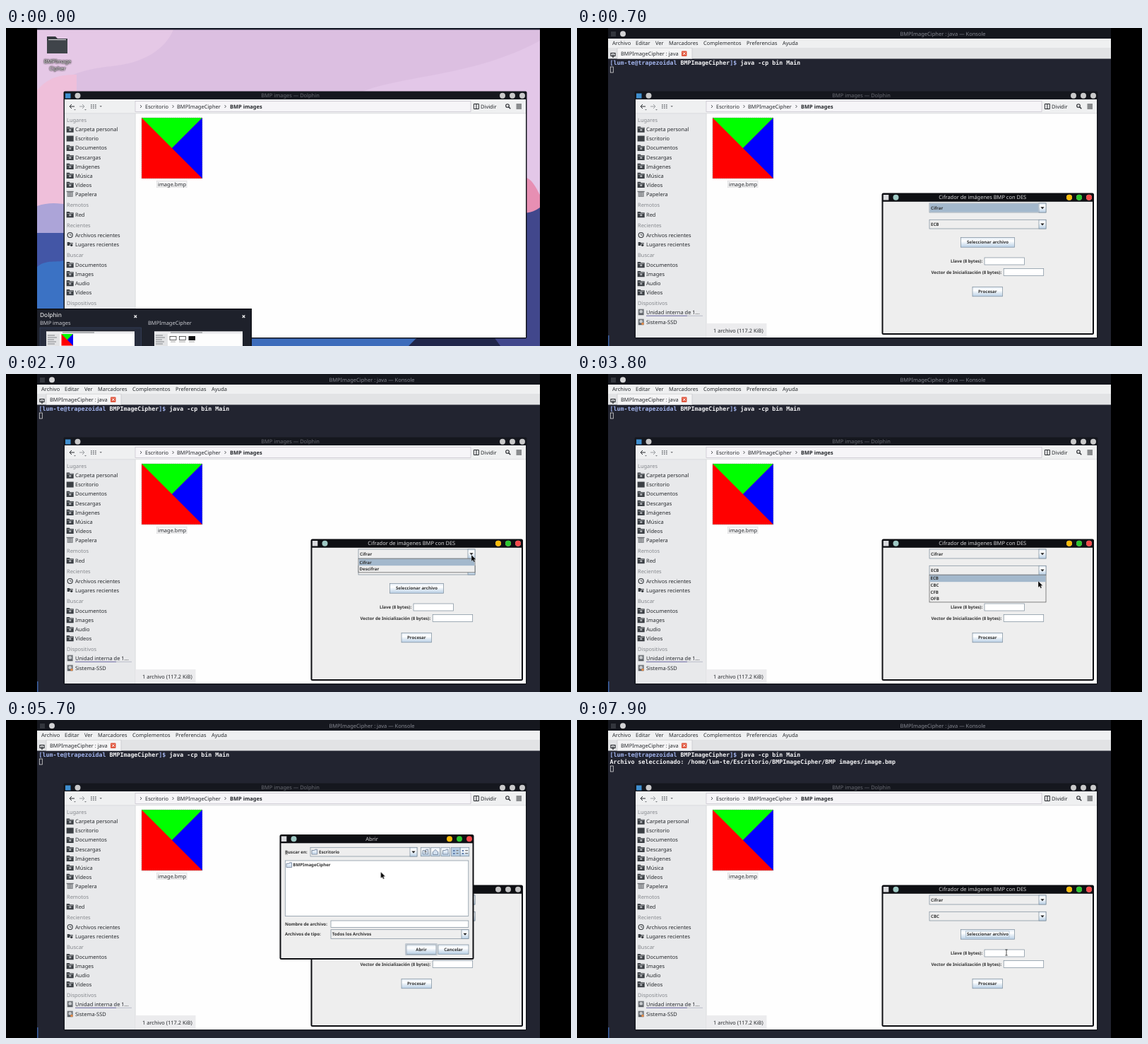
Recreate the animation shown at these times as an HTML page. Size 800 px wide and 450 px high, loop 8000 ms.

```html
<!DOCTYPE html>
<html lang="es">
<head>
<meta charset="utf-8">
<title>Cifrador de imágenes BMP</title>
<style>
html, body { margin: 0; width: 100%; height: 100%; overflow: hidden; background: #000; }
svg { display: block; width: 800px; height: 450px; }
text { font: 7.47px "Noto Sans", "Open Sans", sans-serif; fill: #26292d; white-space: pre; text-rendering: geometricPrecision; }
.b { font-weight: 700; }
.j { font-size: 6.12px; font-weight: 700; fill: #333; }
.m { font: bold 8.3px "DejaVu Sans Mono", "Noto Sans Mono", monospace; fill: #f4f4f6; }
.c { text-anchor: middle; }
.head { fill: #86898e; }
.a { animation: 8s step-end infinite; }
#konsole { animation-name: konsole; }
#tip { animation-name: tip; }
#java { animation-name: java; }
#lit { animation-name: lit; }
#focus1 { animation-name: focus1; }
#pop1 { animation-name: pop1; }
#focus2 { animation-name: focus2; }
#ecb, #wait { animation-name: before; }
#ecb { animation-name: ecb; }
#cbc { animation-name: cbc; }
#pop2 { animation-name: pop2; }
#hover1 { animation-name: hover1; }
#hover2 { animation-name: hover2; }
#ring { animation-name: ring; }
#dialog { animation-name: dialog; }
#home { animation-name: home; }
#desk { animation-name: desk; }
#proj { animation-name: proj; }
#imgs { animation-name: imgs; }
#pick { animation-name: pick; }
#done { animation-name: after; }
#arrow { animation-name: arrow; }
#beam { animation-name: beam; }
#pointer { animation: move 8s linear infinite; }
@keyframes konsole { 0% { opacity: 0 } 1.25% { opacity: .25 } 2.5% { opacity: .5 } 3.75% { opacity: .75 } 5%, to { opacity: 1 } }
@keyframes tip { 0% { opacity: 1 } 1.25% { opacity: .75 } 2.5% { opacity: .5 } 3.75% { opacity: .25 } 5%, to { opacity: 0 } }
@keyframes java { 0% { opacity: 0 } 7.5% { opacity: .6 } 8.75%, to { opacity: 1 } }
@keyframes lit { 0% { opacity: 1 } 56.25% { opacity: 0 } 95%, to { opacity: 1 } }
@keyframes focus1 { 0% { opacity: 1 } 31.25% { opacity: 0 } 38.75% { opacity: 1 } 43.75%, to { opacity: 0 } }
@keyframes pop1 { 0% { opacity: 0 } 31.25% { opacity: 1 } 38.75%, to { opacity: 0 } }
@keyframes focus2 { 0% { opacity: 0 } 51.25% { opacity: 1 } 55%, to { opacity: 0 } }
@keyframes ecb { 0% { opacity: 1 } 51.25%, to { opacity: 0 } }
@keyframes cbc { 0% { opacity: 0 } 51.25%, to { opacity: 1 } }
@keyframes pop2 { 0% { opacity: 0 } 43.75% { opacity: 1 } 51.25%, to { opacity: 0 } }
@keyframes hover1 { 0% { opacity: 1 } 48.75%, to { opacity: 0 } }
@keyframes hover2 { 0% { opacity: 0 } 48.75%, to { opacity: 1 } }
@keyframes ring { 0% { opacity: 0 } 55%, to { opacity: 1 } }
@keyframes dialog { 0% { opacity: 0 } 56.25% { opacity: 1 } 95%, to { opacity: 0 } }
@keyframes home { 0% { opacity: 1 } 67.5%, to { opacity: 0 } }
@keyframes desk { 0% { opacity: 0 } 67.5% { opacity: 1 } 76.25%, to { opacity: 0 } }
@keyframes proj { 0% { opacity: 0 } 76.25% { opacity: 1 } 82.5%, to { opacity: 0 } }
@keyframes imgs { 0% { opacity: 0 } 82.5%, to { opacity: 1 } }
@keyframes pick { 0% { opacity: 0 } 87.5%, to { opacity: 1 } }
@keyframes before { 0% { opacity: 1 } 95%, to { opacity: 0 } }
@keyframes after { 0% { opacity: 0 } 95%, to { opacity: 1 } }
@keyframes arrow { 0% { opacity: 0 } 10% { opacity: 1 } 98.75%, to { opacity: 0 } }
@keyframes beam { 0% { opacity: 0 } 98.75%, to { opacity: 1 } }
@keyframes move {
  0%, 10% { transform: translate(560px, 446px) }
  16.25%, 25% { transform: translate(640px, 396px) }
  31.25%, 36.25% { transform: translate(659px, 256px) }
  38.75% { transform: translate(652px, 265px) }
  42.5%, 43.75% { transform: translate(658px, 278px) }
  47.5% { transform: translate(653px, 293px) }
  50%, 51.25% { transform: translate(648px, 298px) }
  55% { transform: translate(607px, 303px) }
  57.5%, 58.75% { transform: translate(608px, 306px) }
  65%, 70% { transform: translate(625px, 226px) }
  72.5%, 76.25% { transform: translate(438px, 204px) }
  80%, 82.5% { transform: translate(433px, 214px) }
  86.25%, 87.5% { transform: translate(432.5px, 204.5px) }
  92.5%, 95% { transform: translate(590px, 322px) }
  97.5% { transform: translate(603px, 313px) }
  98.75%, to { transform: translate(608px, 329px) }
}
</style>
</head>
<body>
<svg id="stage" viewBox="0 0 800 450"></svg>
<script>
const DARK = '#15171e', EDGE = '#7a8a99', PICK = '#a3b8cc', PANEL = '#eeeeee';

const rect = (x, y, w, h, fill, more = '') => `<rect x="${x}" y="${y}" width="${w}" height="${h}" fill="${fill}" ${more}/>`;
const box = (x, y, w, h, fill, stroke = EDGE) => rect(x, y, w, h, fill, `stroke="${stroke}" stroke-width=".7"`);
const path = (d, fill, more = '') => `<path d="${d}" fill="${fill}" ${more}/>`;
const line = (d, color, w = .8) => path(d, 'none', `stroke="${color}" stroke-width="${w}"`);
const dot = (x, y, fill, r = 4) => `<circle cx="${x}" cy="${y}" r="${r}" fill="${fill}"/>`;
const text = (x, y, s, cls = '', fill = '') => `<text x="${x}" y="${y}" class="${cls}"${fill && ` style="fill:${fill}"`}>${s}</text>`;
const group = (id, ...parts) => `<g id="${id}" class="a">${parts.join('')}</g>`;
const label = (x, y, s) => text(x, y, s, 'j');

// Java widgets
const button = (x, y, w, h, s) => box(x, y, w, h, 'url(#metal)') + text(x + w / 2, y + h / 2 + 2.1, s, 'j c');
const arrowBox = (x, y, h) => box(x, y, 10, h, 'url(#metal)') + path(`M${x + 2.4} ${y + h / 2 - 1.2}h5.2l-2.6 3z`, '#222');
const combo = (x, y, w, h) => box(x, y, w, h, PANEL) + arrowBox(x + w - 10, y, h);
const folder = (x, y) => path(`M${x} ${y + 1.5}h3.6l1-1.3h3v6.8h-7.6z`, '#d3e1f0', 'stroke="#6b7c94" stroke-width=".8"') + line(`M${x + 1} ${y + 3}h6`, '#fff', .8);
const sheet = (x, y) => path(`M${x} ${y}h4l2 2v6h-6z`, '#fff', 'stroke="#555" stroke-width=".7"');

// Sidebar icons
const darkFolder = (x, y) => path(`M${x} ${y - 4}h4l1 1.3h5v7h-10z`, '#3b3f44') + rect(x + 1, y - 2, 8, .6, '#d8d9db') + rect(x + 3.6, y - .4, 3, 2.6, '#aeb1b5');
const icons = {
  f: darkFolder,
  d: (x, y) => rect(x, y - 4, 10, 8, '#3b3f44'),
  t: (x, y) => rect(x + 1, y - 3.4, 8, 7.6, '#8c8f93') + rect(x, y - 4, 10, 1.3, '#6d7074') + line(`M${x + 3.3} ${y - 2}v5m3.2 -5v5`, '#c9cbcd'),
  c: (x, y) => `<circle cx="${x + 5}" cy="${y}" r="3.5" fill="none" stroke="#33373b" stroke-width="1.1"/>` + line(`M${x + 5} ${y - 2}v2.2h2`, '#33373b'),
  p: (x, y) => path(`M${x + 1} ${y - 3}h3l1 1h4v4h-8z`, '#3b3f44') + dot(x + 7, y + 1.3, '#e6e7e9', 2.5) + dot(x + 7, y + 1.3, '#33373b', 1.7),
  h: (x, y) => rect(x + 1, y - 4.3, 8, 8.6, '#73777c') + dot(x + 5, y - .8, '#c8cbce', 2.2) + rect(x + 2, y + 2.5, 6, 1, '#3f4449')
};
const places = [
  ['Lugares', 130], ['Carpeta personal', 143.5, 'f'], ['Escritorio', 156.5, 'd'], ['Documentos', 169.7, 'f'],
  ['Descargas', 182.8, 'f'], ['Imágenes', 195.8, 'f'], ['Música', 208.8, 'f'], ['Vídeos', 221.8, 'f'], ['Papelera', 234.8, 't'],
  ['Remotos', 250.5], ['Red', 264, 'f'],
  ['Recientes', 279.3], ['Archivos recientes', 293, 'c'], ['Lugares recientes', 306, 'p'],
  ['Buscar', 321.3], ['Documentos', 335, 'f'], ['Images', 348, 'f'], ['Audio', 361, 'f'], ['Vídeos', 374, 'f'],
  ['Dispositivos', 389.3], ['Unidad interna de 1...', 402, 'h'], ['Sistema-SSD', 416, 'h']
];

const triangles = (x, y, s) => rect(x, y, s, s, '#f00')
  + path(`M${x} ${y}h${s}l${-s / 2} ${s / 2}z`, '#0f0') + path(`M${x + s} ${y}v${s}l${-s / 2} ${-s / 2}z`, '#00f');
const chevron = x => line(`M${x} 109l2 2l-2 2`, '#33373b');

const wallpaper = rect(44, 0, 712, 450, '#dcbfe1')
  + path('M44 0H238C226 32 192 50 150 54C110 58 90 66 44 90z', '#e5c8e6')
  + path('M44 88C60 70 75 66 100 66V260H44z', '#efbfda')
  + path('M500 92C560 66 660 70 756 18V240H500z', '#e3c7e8')
  + path('M44 252C60 246 75 248 90 250V300H44z', '#aca4d8')
  + path('M44 290H90V350H44z', '#4356a6') + path('M44 338C60 325 75 335 90 326V450H44z', '#3b72c4')
  + path('M730 212C744 208 752 230 756 236V290H730z', '#e78fb3') + path('M730 262C744 262 750 258 756 254V450H730z', '#41478c')
  + rect(90, 436, 490, 14, '#3d6cbb') + path('M570 450L584 436H690L706 450z', '#20264a') + path('M690 436H740V450H700z', '#41478c')
  + rect(44, 0, 712, 2.5, '#1a1d2b');

const desktopIcon = path('M58 12h12l3 3h14v21h-29z', '#35393f') + rect(60, 16, 25, 1.2, '#dadadd') + rect(58, 17.5, 29, 18.5, '#3f444a')
  + `<g style="filter:drop-shadow(0 0 1px #000) drop-shadow(0 .5px .7px #000)">${text(73, 49.5, 'BMPImage', 'c', '#fff')}${text(73, 60, 'Cipher', 'c', '#fff')}</g>`;

const menus = [['Archivo', 50], ['Editar', 83], ['Ver', 111], ['Marcadores', 130], ['Complementos', 179], ['Preferencias', 240], ['Ayuda', 291]];
const blue = s => `<tspan fill="#a3b5ee" style="fill:#a3b5ee">${s}</tspan>`;
const caret = y => box(47.3, y, 4, 8, 'none', '#f0f0f0');
const konsole = group('konsole',
  rect(44, 0, 712, 450, '#222430'), rect(44, 0, 712, 15, DARK),
  rect(48, 5, 7, 7, '#33363d'), dot(65, 8.3, '#d3d3d5'), text(518, 11.2, 'BMPImageCipher : java — Konsole', 'c', '#858790'),
  rect(44, 15, 712, 28.5, '#e2e3e5'), rect(44, 15, 712, 13, '#eff0f1'),
  menus.map(([s, x]) => text(x, 24.2, s)).join(''),
  rect(57, 28, 106, 15.5, '#f4f4f5'), line('M57 43.5V28.3H163V43.5', '#bfc1c4', .6),
  text(62, 39, 'BMPImageCipher : java'), rect(148, 32.5, 7.5, 7.5, '#e0573f', 'rx="1"'), line('M150 34.5l3.5 3.5m0 -3.5l-3.5 3.5', '#fff', 1),
  line('M48 35.5h6v4h-6z', '#26292d', 1.2), line('M51 37v5M48.7 39.7h4.6', '#26292d', 1.2),
  text(46.5, 52, blue('[lum-te@trapezoidal ') + 'BMPImageCipher' + blue(']$ ') + 'java -cp bin Main', 'm'),
  group('wait', caret(55)),
  group('done', text(46.5, 61.7, 'Archivo seleccionado: /home/lum-te/Escritorio/BMPImageCipher/BMP images/image.bmp', 'm'), caret(65)),
  rect(44, 435, 1.5, 15, '#3d64a8'));

const dolphin = rect(81.5, 89.5, 656, 350, DARK, 'rx="2"')
  + rect(84, 92.5, 7.5, 7, '#3f8fd0') + dot(101.5, 95.8, '#c9c9ca')
  + [703, 717, 731].map(x => dot(x, 95.8, '#c9c9ca')).join('')
  + text(402.5, 98.4, 'BMP images — Dolphin', 'c', '#686a72')
  + rect(83, 101, 653, 337, '#fefefe') + rect(83, 101, 653, 20, '#eff0f1') + rect(83, 121, 100, 317, '#e8e9eb')
  + line('M83 120.8H736M183.2 121V438', '#cbcdd0', .6)
  + line('M97 111H90.5M93 108l-3 3l3 3', '#26292d', 1) + line('M104 111h6.5M108 108l3 3l-3 3', '#9a9da1', 1)
  + path('M96 115h3l-1.5 1.6zM111 115h3l-1.5 1.6zM132.5 110h3.4l-1.7 2z', '#77797d')
  + [120, 123, 126].map(x => [108, 110.3, 112.6].map(y => rect(x, y, 1.7, 1.5, '#7d8084')).join('')).join('')
  + box(183, 103.5, 475, 15, '#f6f5f8', '#c5c0cc')
  + chevron(190) + text(197, 113.8, 'Escritorio') + chevron(235.5) + text(242, 113.8, 'BMPImageCipher') + chevron(309.5) + text(317, 113.8, 'BMP images', 'b')
  + line('M662.4 107.5h7v7h-7zM665.9 107.5v7', '#26292d', 1) + text(672, 113.8, 'Dividir')
  + `<circle cx="710" cy="110" r="2.3" fill="none" stroke="#26292d" stroke-width="1.1"/>` + line('M711.7 111.7l2.6 2.6', '#26292d', 1.3)
  + line('M722.5 108h7.5m-7.5 2h7.5m-7.5 2h7.5m-7.5 2h7.5', '#26292d', 1.1)
  + places.map(([s, y, k]) => k ? icons[k](85.7, y) + text(98, y + 2.7, s) : text(86, y + 2.7, s, 'head')).join('')
  + rect(98, 406.8, 80, 1, '#b9bbc9') + rect(98, 406.8, 58, 1, '#7370a8') + dot(93, 418.5, '#e08a4a', 1.8)
  + triangles(192, 127, 86) + rect(192, 127, 86, 86, 'none', 'stroke="#9a9a9a" stroke-width=".8" stroke-dasharray="1.4 1.4"')
  + box(213.5, 216.3, 42.5, 9.4, '#f5f5f6', '#dadadc') + text(235, 223.6, 'image.bmp', 'c')
  + rect(183.5, 418, 85, 20, '#ececee') + text(193, 430.8, '1 archivo (117.2 KiB)');

const thumb = x => rect(x, 428, 125, 22, '#fdfdfd') + rect(x, 428, 125, 1.5, '#20222b') + rect(x, 429.5, 125, 3, '#e9e9ec')
  + rect(x, 432.5, 19, 18, '#e2e3e5') + line(`M${x + 2} 435h10m-10 3h13m-13 3h9m-9 3h12m-12 3h10`, '#77797d', .9) + line(`M${x + 23} 431h45`, '#55585c', .8);
const close = x => line(`M${x - 1.8} 406.4l3.6 3.6m0 -3.6l-3.6 3.6`, '#fff', 1.2);
const tip = group('tip',
  rect(44, 397, 304, 53, '#0f1016'), rect(44, 398.5, 302.5, 52, '#1e212b'),
  `<text x="48" y="408.7" style="font-size:8.35px;fill:#fff">Dolphin</text>`,
  text(48, 419.7, 'BMP images', '', '#c9cad0'), text(201, 419.7, 'BMPImageCipher', '', '#c9cad0'), close(183.3), close(336.5),
  box(48, 424, 143.5, 30, '#272d3d', '#384460'), thumb(57), triangles(78.5, 433, 16.5), thumb(210),
  box(232, 436.5, 9, 5, '#fff', '#222'), box(245.5, 436.5, 9, 5, '#fff', '#222'), rect(258.5, 436, 9.5, 6, '#111'),
  line('M233 444h7m5 0h9m5 0h8', '#888', .8));

const lights = (x, y) => dot(x, y, '#fcbb08') + dot(x + 14, y, '#2dc62f') + dot(x + 28, y, '#f54a4c');
const frame = (x, y, w, h, title) => rect(x, y, w, h, '#0e0f13', 'rx="2.5"') + rect(x + 2, y + 12.3, w - 4, h - 14.3, PANEL)
  + rect(x + 2.3, y + 2.5, 7.5, 7.5, '#d9dadd') + dot(x + 20, y + 6.2, '#9fc9c4')
  + text(x + w / 2 - (w < 290 ? 7 : 7.5), y + 8.9, title, 'c', '#d6d6d8');

const modes = ['ECB', 'CBC', 'CFB', 'OFB'];
const java = group('java',
  frame(431.5, 233.5, 300.5, 200.5, 'Cifrador de imágenes BMP con DES'),
  [697, 711, 725].map(x => dot(x, 239.8, '#c3c3c4')).join(''), group('lit', lights(697, 239.8)),
  combo(499, 248, 165, 13), group('focus1', rect(499.5, 248.5, 154, 12, PICK)), label(501, 256.7, 'Cifrar'),
  combo(499, 271.3, 165, 12.7), group('focus2', rect(499.5, 271.8, 154, 11.7, PICK)),
  group('ecb', label(501, 279.8, 'ECB')), group('cbc', label(501, 279.8, 'CBC')),
  button(543.5, 296.5, 76, 13.7, 'Seleccionar archivo'), group('ring', box(550.5, 298.8, 61.5, 9, 'none', PICK)),
  label(529, 332.2, 'Llave (8 bytes):'), box(577, 325, 56.5, 10, '#fff'),
  label(501.5, 347.8, 'Vector de Inicialización (8 bytes):'), box(604.2, 340.5, 56.5, 10, '#fff'),
  button(560, 366.3, 42.5, 13.5, 'Procesar'),
  group('pop1', box(499, 261.3, 165, 19.5, PANEL, '#555'), rect(499.5, 261.8, 164, 9.4, PICK), label(500.5, 268.6, 'Cifrar'), label(500.5, 278, 'Descifrar')),
  group('pop2', box(499, 284.4, 165, 38.5, PANEL, '#555'),
    group('hover1', rect(499.5, 284.8, 164, 9.4, PICK)), group('hover2', rect(499.5, 294.2, 164, 9.4, PICK)),
    modes.map((s, i) => label(500.5, 291.4 + i * 9.55, s)).join('')));

// File chooser
const columns = [
  ['prueba-de-ingreso-breve', 'Ejercicios', 'senderismo', 'notas-simples', 'TrazadoDeFiguras2034', 'tarea'],
  ['Duendes', 'Descargas', 'sec2', 'Documentos', 'Documents', 'pinarmolino'],
  ['Downloads', 'Bandeja', 'Escritorio', 'primeros-pasos', 'RED7', 'nubora']
];
const files = cols => cols.map((names, c) => names.map((s, r) =>
  folder(397 + c * 103.7, 201.6 + r * 11.05) + label(406.3 + c * 103.7, 207.2 + r * 11.05, s)).join('')).join('');
const inDir = s => folder(433, 183) + label(443, 188.9, s);
const scroll = rect(395.5, 269, 259, 8.5, '#e9ebee') + box(395.5, 269, 8, 8.5, PANEL) + box(646, 269, 8.5, 8.5, PANEL)
  + path('M401 271v4.4l-2.6 -2.2zM649 271v4.4l2.6 -2.2z', '#222') + box(403.8, 269.4, 75, 7.8, 'url(#metal)', '#6382bf') + line('M440 271.5v3.5m2 -3.5v3.5', '#6382bf', .6);
const tool = (x, on) => box(x, 180.3, 12.5, 12.5, on ? '#b8cfe5' : 'url(#metal)');
const marks = (x, w) => [184, 188].map(y => rect(x + 2.5, y, 2.4, 2, '#5b79a8') + rect(x + 7, y, w, 1.3, '#777')).join('');
const dialog = group('dialog',
  frame(387.5, 162, 275, 177, 'Abrir'), lights(628, 168.2),
  label(395, 188.8, 'Buscar en:'), line('M395 190h4', '#333', .6), combo(431, 180.3, 151, 12.7),
  [587.5, 601.7, 616].map(x => tool(x)).join(''), tool(630.6, true), tool(643.2),
  folder(590, 183), line('M594 189v-4m-1.5 1.5l1.5 -1.5l1.5 1.5', '#333', .7),
  path('M604.5 186.5l3.5 -3l3.5 3v4h-7z', '#d3e1f0', 'stroke="#6b7c94" stroke-width=".8"'), folder(618.5, 183),
  marks(630.6, 3), marks(643.2, 4),
  box(395.3, 199, 259.5, 78.5, '#fff'),
  label(395, 291, 'Nombre de archivo:'), box(460, 284, 194.8, 9.5, '#fff'),
  label(395, 305.4, 'Archivos de tipo:'), combo(460, 296.7, 195, 12.7), label(461.7, 305.2, 'Todos los Archivos'),
  button(567, 318, 42, 13.3, 'Abrir'), box(565.8, 316.8, 44.4, 15.7, 'none', '#9aa9b8'), button(612, 318, 43, 13.3, 'Cancelar'),
  group('home', inDir('lum-te'), `<g clip-path="url(#list)">${files(columns)}</g>`, scroll, line('M461.6 285.5v6.5', '#333', .7)),
  group('desk', inDir('Escritorio'), files([['BMPImageCipher']])),
  group('proj', inDir('BMPImageCipher'), files([['bin', 'BMP images', 'src']])),
  group('imgs', inDir('BMP images'), group('pick', rect(405, 200.6, 36.5, 9, '#b8cfe5'), label(461.7, 291, 'image.bmp')),
    sheet(397.7, 201.2), label(406.3, 207.2, 'image.bmp')));

const pointer = `<g id="pointer">`
  + group('arrow', path('M0 0V9L2.1 7.2L3.5 10.2L5 9.5L3.7 6.6H6.4z', '#050505', 'stroke="#fff" stroke-width=".3"'))
  + group('beam', line('M-1.6 -4h3.2M0 -4v8M-1.6 4h3.2', '#222', .8)) + '</g>';

const defs = `<defs><linearGradient id="metal" x2="0" y2="1"><stop stop-color="#e3ecf5"/><stop offset=".35" stop-color="#fff"/><stop offset="1" stop-color="#b8cfe5"/></linearGradient>
<clipPath id="list"><rect x="395.5" y="199" width="258.8" height="70"/></clipPath></defs>`;

document.getElementById('stage').innerHTML = defs + wallpaper + desktopIcon + konsole + dolphin + java + dialog + tip + pointer
  + rect(0, 0, 44, 450, '#000') + rect(756, 0, 44, 450, '#000');
</script>
</body>
</html>
```
